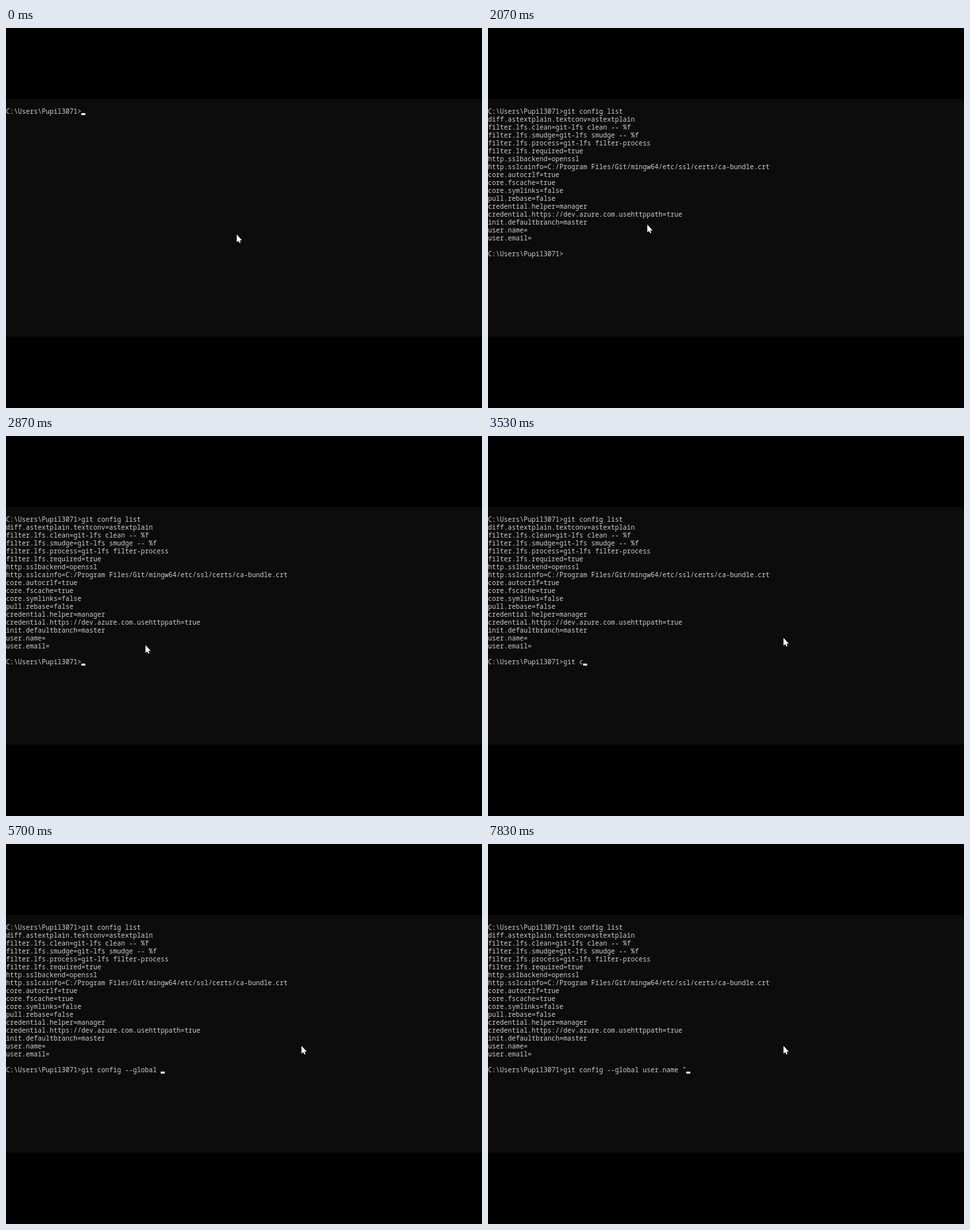
Animation of 720x576 px, one loop 8 s. Source, as an HTML page:

```html
<!DOCTYPE html>
<html lang="en">
<head>
<meta charset="utf-8">
<title>Terminal</title>
<style>
  html, body { margin: 0; width: 100%; height: 100%; overflow: hidden; background: #000; }
  svg { display: block; width: 100%; height: 100%; }
  text { font: 10px "Noto Sans Mono", monospace; fill: #ccc; white-space: pre; font-variant-ligatures: none; }
</style>
</head>
<body>
<svg viewBox="0 0 720 576">
  <rect width="720" height="576" fill="#000"/>
  <rect y="108" width="720" height="360" fill="#0c0c0c"/>
  <g id="lines"></g>
  <rect id="caret" width="6" height="3" fill="#fff"/>
  <path id="pointer" d="M0 0V11.8L2.6 9.4L4.3 13L6 12.2L4.4 8.7H8Z" fill="#fff"/>
</svg>
<script>
const LOOP = 8000, TICK = 1000 / 30;
const CELL = 6, ROW = 12, BASE = 130;
const ENTER = 1700, READY = 1830;  // the command runs and prints in between
const BLINK = 530, PAUSE = 230;    // PAUSE separates bursts of typing
const prompt = 'C:\\Users\\Pupil3071>';
const output = `diff.astextplain.textconv=astextplain
filter.lfs.clean=git-lfs clean -- %f
filter.lfs.smudge=git-lfs smudge -- %f
filter.lfs.process=git-lfs filter-process
filter.lfs.required=true
http.sslbackend=openssl
http.sslcainfo=C:/Program Files/Git/mingw64/etc/ssl/certs/ca-bundle.crt
core.autocrlf=true
core.fscache=true
core.symlinks=false
pull.rebase=false
credential.helper=manager
credential.https://dev.azure.com.usehttppath=true
init.defaultbranch=master
user.name=
user.email=`.split('\n');

// Bursts of typing: start, text, caret state afterwards
const bursts = [
  [100, 'git conf', 'dark'], [870, 'ig l', 'lit'], [1230, 'ist', 'dark'],
  [3370, 'git c', 'dark'], [3800, 'onfig', 'lit'], [4430, ' ', 'dark'],
  [4630, '-', 'lit'], [4870, '-', 'dark'], [5070, 'glob', 'lit'],
  [5470, 'al ', 'lit'], [5930, 'user', 'dark'], [6330, '.', 'dark'],
  [6770, 'name', 'dark'], [7200, '', 'lit'], [7400, ' ', 'dark'], [7730, '"', 'lit']
].map(([start, text, rest], i, all) => {
  const next = i + 1 < all.length ? all[i + 1][0] : LOOP;
  const end = Math.max(start + 40, Math.min(next, start < ENTER ? ENTER : LOOP) - PAUSE);
  const dark = rest === 'dark';
  return { start, text, end, dark, step: (end - start) / Math.max(1, text.length - !dark) };
});

const lines = document.getElementById('lines');
const caret = document.getElementById('caret');
const pointer = document.getElementById('pointer');

const rows = Array.from({ length: output.length + 3 }, (_, i) => {
  const el = document.createElementNS('http://www.w3.org/2000/svg', 'text');
  el.setAttribute('y', BASE + i * ROW);
  return lines.appendChild(el);
});
const lastRow = rows.length - 1;

// Text typed by time t in bursts that start within [from, to)
const typed = (from, to, t) => prompt + bursts
  .filter(b => b.start >= from && b.start < to && b.start <= t)
  .map(b => b.text.slice(0, Math.floor((t - b.start) / b.step + 1.001)))
  .join('');

function caretLit(t) {
  const burst = bursts.filter(b => b.start <= t).pop();
  if (t >= ENTER && burst.start < ENTER) return Math.floor((t - READY + 330) / BLINK) % 2 === 0;
  return !burst || t < burst.end || !burst.dark;
}

// Follow [time, value] points, slowing down into each one
function glide(points, t) {
  let value = points[0][1];
  for (let i = 1; i < points.length; i++) {
    const [t0, v0] = points[i - 1], [t1, v1] = points[i];
    const u = Math.min(1, (t - t0) / (t1 - t0));
    if (u > 0) value = v0 + (v1 - v0) * Math.sin(u * Math.PI / 2);
  }
  return Math.round(value);
}
const pathX = [[1967, 349], [2387, 53], [2795, 112], [3170, 447]];
const pathY = [[1967, 313], [2136, 294], [2795, 322], [3170, 306]];

function setText(el, s) {
  if (el.textContent !== s) el.textContent = s;
}

function draw(t) {
  const done = Math.max(0, Math.min(1, (t - ENTER) / (READY - ENTER)));
  const shown = Math.floor(done * output.length);
  setText(rows[0], typed(0, ENTER, t));
  output.forEach((line, i) => setText(rows[i + 1], i < shown ? line : ''));
  setText(rows[lastRow], t < READY ? '' : typed(ENTER, LOOP, t));

  const row = t < ENTER ? 0 : t < READY ? shown + 1 : lastRow;
  caret.setAttribute('x', rows[row].textContent.length * CELL);
  caret.setAttribute('y', BASE - 1 + row * ROW);
  caret.setAttribute('visibility', caretLit(t) ? 'visible' : 'hidden');

  const step = Math.floor((t + 4) / TICK) * TICK;
  pointer.setAttribute('transform', `translate(${glide(pathX, step)} ${glide(pathY, step)})`);
}

const start = performance.now();
function loop() {
  draw((performance.now() - start) % LOOP);
  requestAnimationFrame(loop);
}
loop();
</script>
</body>
</html>
```
